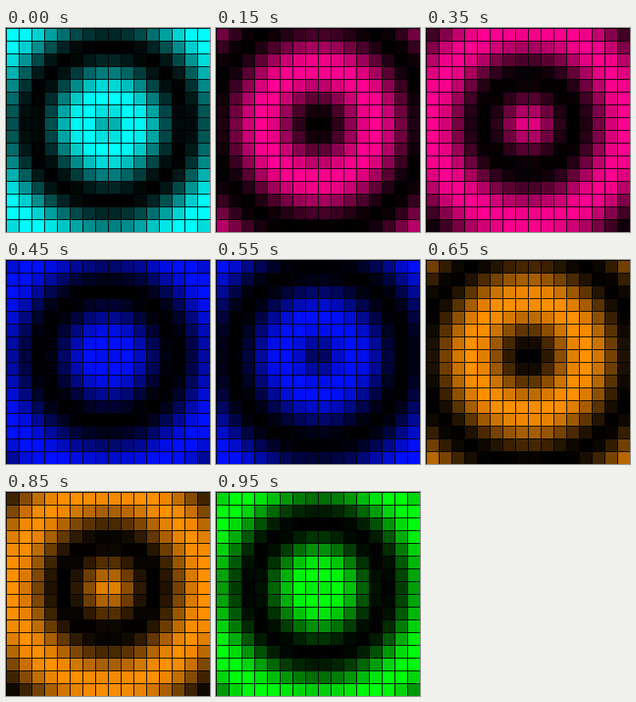
Recreate the animation shown at these times as an HTML page with a canvas. Size 256 px wide and 256 px high, loop 1000 ms.

```html
<!DOCTYPE html>
<html>
<head>
<meta charset="utf-8">
<style>
html, body { margin: 0; width: 100%; height: 100%; overflow: hidden; background: #000; }
canvas { display: block; width: 100vw; height: 100vh; image-rendering: pixelated; }
</style>
</head>
<body>
<canvas id="stage" width="256" height="256"></canvas>
<script>
const ctx = document.getElementById('stage').getContext('2d');
const STEP = 50, STEPS = 20, CELL = 16, COUNT = 16;
const colors = [
  [0, 255, 255],
  [255, 0, 144],
  [0, 16, 255],
  [255, 144, 0],
  [0, 255, 12]
];

function draw(step) {
  // The colour switches every five steps, first at step 3
  const color = colors[Math.floor((step + 2) / 5)];
  ctx.fillStyle = '#000';
  ctx.fillRect(0, 0, 256, 256);
  for (let y = 0; y < COUNT; y++) {
    for (let x = 0; x < COUNT; x++) {
      const r = Math.hypot(x - 7.5, y - 7);
      const level = 0.5 + 0.5 * Math.sin(2 * Math.PI * (r / 8 - step / 10));
      ctx.fillStyle = `rgb(${color.map(c => Math.round(c * level))})`;
      ctx.fillRect(x * CELL + 1, y * CELL + 1, CELL - 1, CELL - 1);
    }
  }
}

const start = performance.now();
function tick() {
  const time = Math.max(0, performance.now() - start);
  draw(Math.floor(time / STEP) % STEPS);
  requestAnimationFrame(tick);
}
tick();
</script>
</body>
</html>
```
